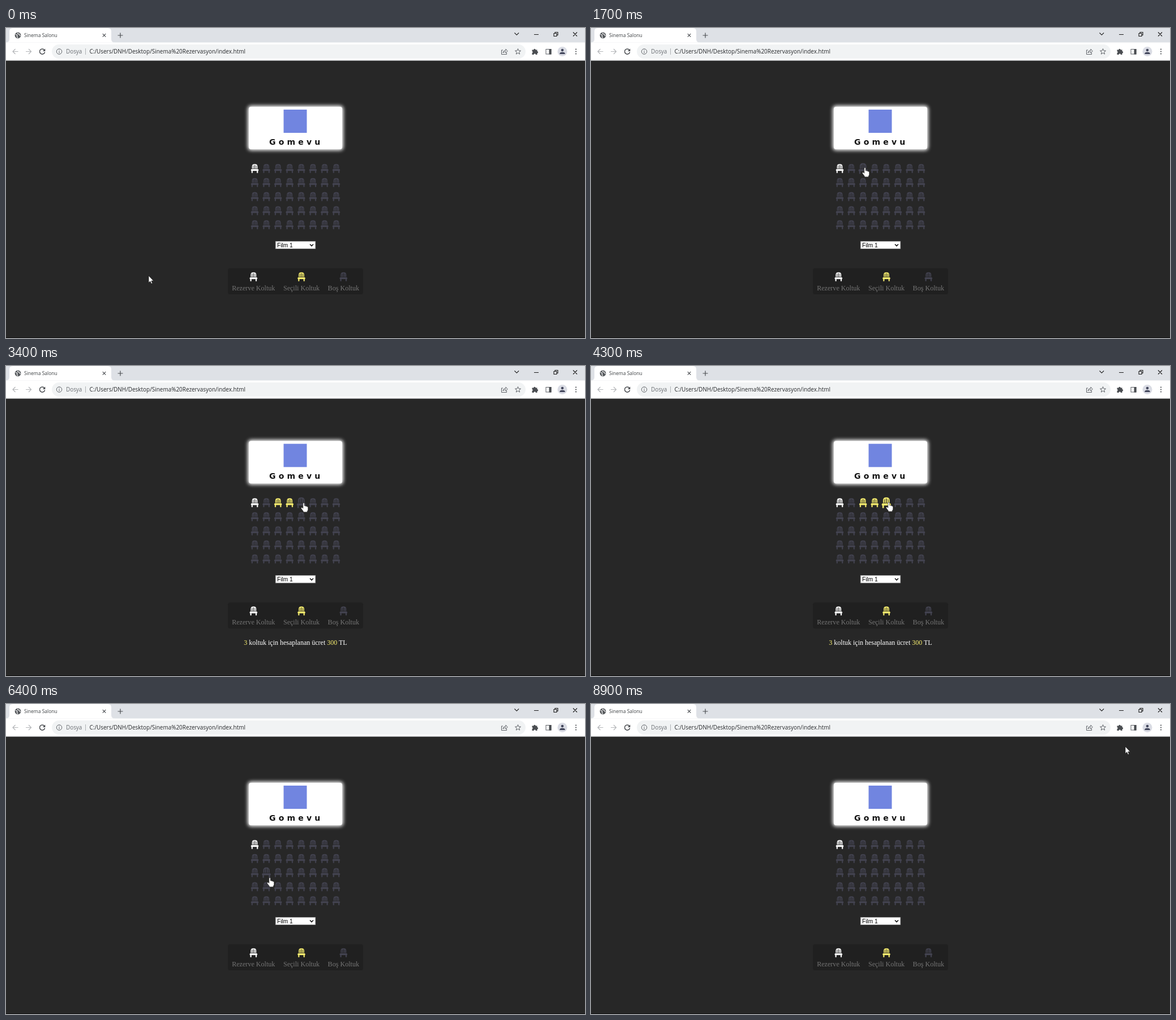
Animation, 1023 px wide and 547 px high, one loop 9 s. Source, as an HTML page:

```html
<!DOCTYPE html>
<html lang="tr">
<head>
<meta charset="utf-8">
<title>Sinema Salonu</title>
<style>
  html, body { margin: 0; width: 100%; height: 100%; overflow: hidden; background: #272727; }
  svg { display: block; width: 1023px; height: 547px; }
  .ui { font-family: "Open Sans", "Noto Sans", sans-serif; }
  .serif { font-family: "Liberation Serif", "Times New Roman", serif; }
  .arial { font-family: "Liberation Sans", Arial, sans-serif; }
  .brand { font: 700 14px "DejaVu Sans", sans-serif; letter-spacing: 5.2px; }
  .line { fill: none; stroke: #4a4d51; stroke-width: 1.2; }
  .fine { fill: none; stroke: #5f6368; stroke-width: 1; }
  .window { fill: none; stroke: #1c1c1c; stroke-width: 1.1; }
  .glow { filter: blur(3px); }
</style>
</head>
<body>
<svg viewBox="0 0 1023 547">
  <defs>
    <path id="chair" transform="scale(.94 .97)" d="M-5 0V-4a4 4 0 0 1 4-4h2a4 4 0 0 1 4 4V0H3.5V-4a2.5 2.5 0 0 0-1.25-2.1V0H.75V-6.5h-1.5V0h-1.5V-6.1A2.500 2.500 0 0 0-3.500-4V0zM-5.700 1H5.700a1 1 0 0 1 1 .7l.3 1a1 1 0 0 1-1 1.300v3.500a.5.5 0 0 1-.5.5h-1a.5.5 0 0 1-.5-.5V4H-4v3.500a.5.5 0 0 1-.5.5h-1a.5.5 0 0 1-.5-.5V4a1 1 0 0 1-1-1.300l.3-1a1 1 0 0 1 1-.7z"/>
  </defs>

  <!-- browser window -->
  <rect width="1023" height="56.9" fill="#fff"/>
  <rect width="1023" height="25.5" fill="#dee1e6"/>
  <path d="M0 25.5q6 0 6-6V6q0-6 6-6H180q6 0 6 6V19.5q0 6 6 6z" fill="#fff"/>
  <rect y="56.9" width="1023" height=".8" fill="#dadce0"/>
  <circle cx="21" cy="13" r="5.4" fill="#55585c"/>
  <path d="M17 11l3 2.2-.6 2.3 1.6 2.2M21 8.4l-.5 2 3 .3.6 2.4 1.6.4" fill="none" stroke="#fff" stroke-width="1.1"/>
  <text class="ui" x="32" y="16" font-size="8.5" fill="#3c4043">Sinema Salonu</text>
  <path class="line" d="M170.800 10.200l5.400 5.400m0-5.400l-5.400 5.400M197.500 13h9m-4.500-4.500v9"/>
  <path class="window" d="M898.500 8.500l3.800 3.800 3.800-3.800M933 11.500h8M968 9.500h5v5h-5zM970 9.500v-2h5v5h-2M1002 7.500l7 7m0-7l-7 7"/>

  <g class="line">
    <path d="M21.500 41.500H12m4.500-4.500L12 41.500l4.500 4.500M35 41.500h9.500M40 37l4.500 4.500L40 46" stroke="#b4b6b9"/>
    <path d="M67.800 38.800a4.600 4.600 0 1 0 .8 3.700" stroke-width="1.5"/>
    <path d="M69.300 36.500v4.400h-4.400z" fill="#4a4d51" stroke="none"/>
  </g>
  <rect x="81" y="29" width="837" height="25" rx="12.5" fill="#f1f3f4"/>
  <g class="fine">
    <circle cx="94" cy="41.500" r="4.700"/>
    <path d="M94 41v3.200M94 38.600v1.200"/>
    <path d="M140.500 36v11" stroke="#aeb1b5"/>
    <path d="M878 39h-2.500v7.500h9V44M878 44c.3-3 2-4.500 5-4.500v-2.300l3.300 3.600-3.300 3.400v-2.300c-2 0-3.700.4-5 2.100z"/>
    <path id="star"/>
    <rect x="954" y="37.500" width="9" height="8.500"/>
  </g>
  <rect x="959.500" y="37" width="4" height="9.500" fill="#4a4d51"/>
  <path d="M929.500 38.500h2.800a1.700 1.700 0 1 1 3.400 0h2.800v2.600a1.700 1.700 0 1 1 0 3.400V47h-2.600a1.700 1.700 0 0 0-3.400 0h-3v-2.800a1.700 1.700 0 0 0 0-3.200z" fill="#4a4d51"/>
  <circle cx="983" cy="41.500" r="8.500" fill="#dadce4"/>
  <g fill="#43475c">
    <circle cx="983" cy="39" r="2.300"/>
    <path d="M978.300 46v-1.300q1-2.300 4.700-2.300t4.700 2.300V46z"/>
  </g>
  <g fill="#4a4d51"><circle cx="1007" cy="37.500" r="1.100"/><circle cx="1007" cy="41.500" r="1.100"/><circle cx="1007" cy="45.500" r="1.100"/></g>
  <text class="ui" x="106" y="45" font-size="9.900" fill="#6a6e73">Dosya</text>
  <text class="ui" x="147.500" y="45" font-size="9.950" fill="#26282b">C:/Users/DNH/Desktop/Sinema%20Rezervasyon/index.html</text>

  <!-- page -->
  <rect y="546" width="1023" height="1" fill="#101010"/>
  <g id="page">
    <rect class="glow" x="427" y="137" width="169" height="79" rx="6" fill="#fff"/>
    <rect x="429" y="139" width="165" height="75" rx="4" fill="#fff"/>
    <rect x="490.500" y="144" width="41" height="41" fill="#7185e0"/>
    <text class="brand" x="465" y="205.500" fill="#141414">Gomevu</text>
    <g id="seats"></g>
    <rect x="476.200" y="376.300" width="70.600" height="13.300" fill="#fff" stroke="#8a8a8a" stroke-width=".7"/>
    <text class="arial" x="479" y="386.700" font-size="10.200" fill="#000">Film 1</text>
    <path d="M537 381.500l3 3 3-3" fill="none" stroke="#111" stroke-width="1.600"/>
    <rect x="392" y="424" width="239" height="46" rx="4" fill="#202020"/>
    <g id="legend" class="serif" font-size="12.100" fill="#747474" text-anchor="middle"></g>
    <text id="total" class="serif" x="511.500" y="499" font-size="12" fill="#fff" text-anchor="middle"><tspan id="count" fill="#f7ee70"></tspan> koltuk için hesaplanan ücret <tspan id="price" fill="#f7ee70"></tspan> TL</text>
  </g>

  <g id="cursor" stroke-linejoin="round">
    <path id="arrow" d="M0 0V12.500L2.800 9.900 4.700 14.300 6.700 13.500 4.800 9.200H8.700z" fill="#fff" stroke="#111" stroke-width=".7"/>
    <path id="hand" transform="scale(.93)" d="M-1.300.8a1.300 1.300 0 0 1 2.600 0V5.200q2-.9 2.500.7 1.800-.7 2.400.7 2-.2 2 1.600V12q0 2-1.500 3.200V17H-.7V15.500L-4.700 10.300q-.6-1.500.8-1.900 1.200-.1 2.600 1.600z" fill="#fff" stroke="#222" stroke-width=".6"/>
  </g>
</svg>
<script>
const LOOP = 9000, STEP = 100;
const FREE = [68, 68, 81], CHOSEN = [247, 238, 112], TAKEN = [255, 255, 255];
const $ = id => document.getElementById(id);
const rgb = c => `rgb(${c.map(Math.round)})`;
const clamp = v => Math.min(1, Math.max(0, v));

// time, x, y of the pointer tip
const path = [
  [0, 252, 437], [300, 252, 437], [900, 390, 335], [1500, 482, 249], [1700, 484, 247],
  [2000, 484, 247], [2400, 511, 250], [2700, 511, 250], [3200, 526, 243], [3600, 526, 241],
  [4500, 526, 241], [4800, 506, 243], [5100, 504, 244], [5300, 484, 245], [5800, 482, 246],
  [6400, 466, 307], [7000, 500, 330], [7600, 640, 300], [8000, 905, 150], [8400, 944, 75], [9000, 944, 75]
];
// seat, from, to
const hovers = [[2, 1550, 2150], [3, 2250, 2800], [4, 3050, 4650], [3, 4750, 5250], [2, 5350, 5850], [17, 6300, 6550]];
const picks = [[2, 1850, 5650], [3, 2480, 5050], [4, 3400, 4600]];

function make(tag, parent, attrs, text = '') {
  const el = document.createElementNS('http://www.w3.org/2000/svg', tag);
  for (const key in attrs) el.setAttribute(key, attrs[key]);
  el.textContent = text;
  return parent.appendChild(el);
}

function makeChair(parent, color, x, y) {
  const paint = rgb(color);
  return make('use', parent, {
    href: '#chair', fill: paint, stroke: paint, 'stroke-width': 0.3, transform: `translate(${x} ${y})`
  });
}

const seats = Array.from({ length: 40 }, (_, i) => {
  const x = 439.5 + 20.57 * (i % 8), y = 248 + 24.8 * Math.floor(i / 8);
  return { x, y, el: makeChair($('seats'), i ? FREE : TAKEN, x, y) };
});

[['Rezerve Koltuk', 437.3, TAKEN], ['Seçili Koltuk', 522, CHOSEN], ['Boş Koltuk', 596.3, FREE]].forEach(([label, x, color]) => {
  makeChair($('legend'), color, x, 439);
  make('text', $('legend'), { x, y: 463 }, label);
});

$('star').setAttribute('d', 'M' + Array.from({ length: 10 }, (_, i) => {
  const r = i % 2 ? 2.3 : 5.3, a = i * Math.PI / 5;
  return `${904.5 + r * Math.sin(a)} ${41.8 - r * Math.cos(a)}`;
}).join('L') + 'z');

const isOn = (t, [, from, to]) => t >= from && t < to;

// eased 0..1 level that rises after `from` and falls after `to`
function level(list, seat, t, duration) {
  const ease = v => 1 - (1 - clamp(v / duration)) ** 2.3;
  return clamp(list.filter(item => item[0] === seat)
    .reduce((sum, [, from, to]) => sum + ease(t - from) - ease(t - to), 0));
}

function pointerAt(t) {
  const i = path.findIndex(p => p[0] > t);
  const [t0, x0, y0] = path[i - 1], [t1, x1, y1] = path[i];
  const u = (t - t0) / (t1 - t0), k = u * u * (3 - 2 * u);
  return [x0 + (x1 - x0) * k, y0 + (y1 - y0) * k];
}

function draw(t) {
  const count = picks.filter(p => isOn(t, p)).length;
  $('page').setAttribute('transform', `translate(0 ${count ? -6.7 : 0})`);
  $('total').style.display = count ? '' : 'none';
  $('count').textContent = count;
  $('price').textContent = count * 100;

  seats.forEach(({ x, y, el }, i) => {
    const scale = 1 + 0.2 * level(hovers, i, t, 200);
    el.setAttribute('transform', `translate(${x} ${y}) scale(${scale})`);
    if (i) {
      const k = level(picks, i, t, 300);
      const paint = rgb(FREE.map((c, n) => c + (CHOSEN[n] - c) * k));
      el.setAttribute('fill', paint);
      el.setAttribute('stroke', paint);
    }
  });

  const hand = hovers.some(h => isOn(t, h));
  $('hand').style.display = hand ? '' : 'none';
  $('arrow').style.display = hand ? 'none' : '';
  $('cursor').setAttribute('transform', `translate(${pointerAt(t)})`);
}

const start = performance.now();
function tick() {
  const t = (performance.now() - start) % LOOP;
  draw(Math.floor(t / STEP) * STEP);
  requestAnimationFrame(tick);
}
tick();
</script>
</body>
</html>
```
